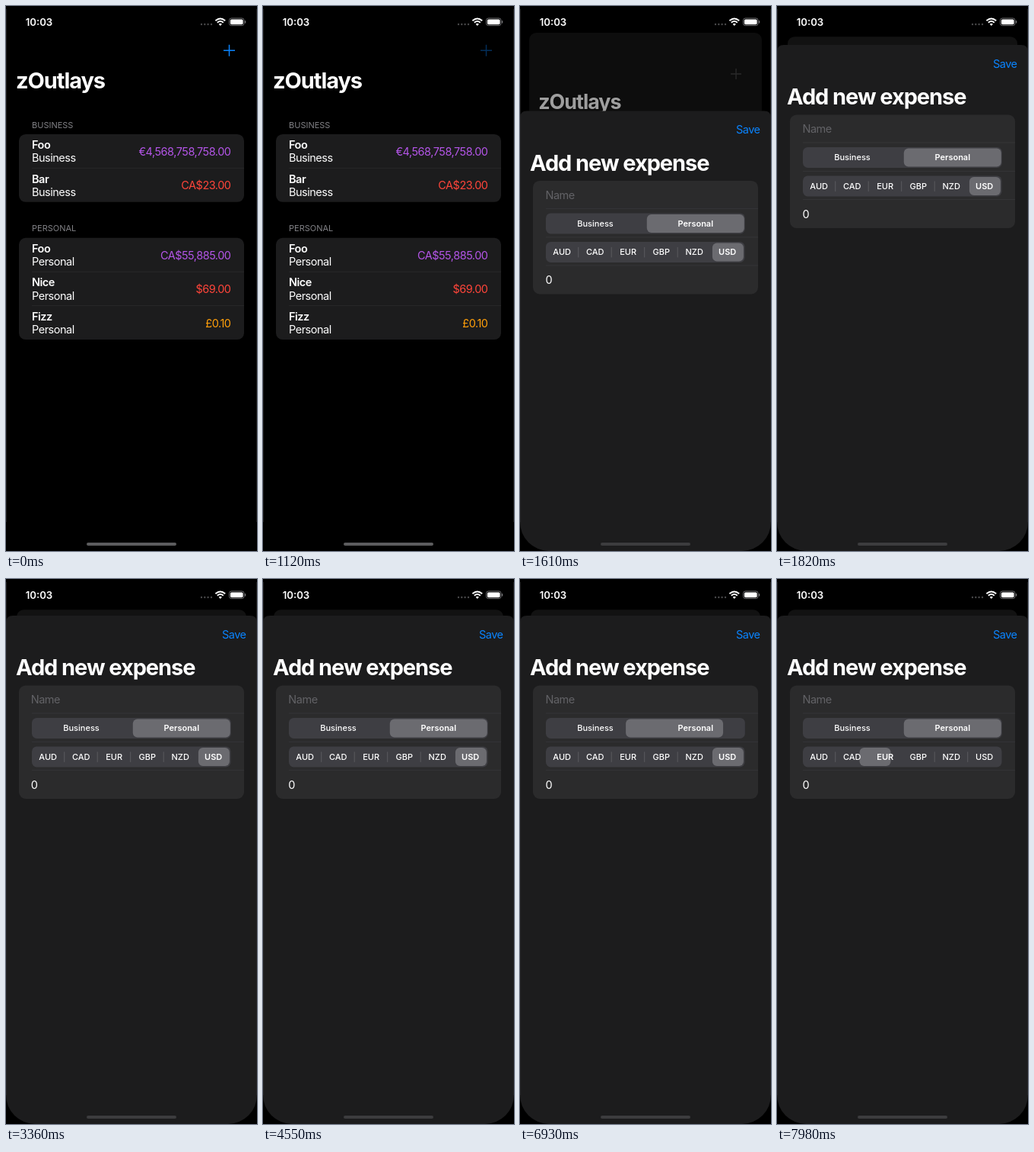
An HTML page for the animation above (8000 ms loop, 330 by 714 pixels).

```html
<!DOCTYPE html>
<html lang="en">
<head>
<meta charset="utf-8">
<title>Expense sheet</title>
<style>
  html, body { margin: 0; width: 100%; height: 100%; overflow: hidden; background: #000; }
  svg { display: block; width: 330px; height: 714px; }
  text { font: 400 14.5px Inter, sans-serif; letter-spacing: -.034em; fill: #fff; }
  .title { font-size: 29px; font-weight: 700; letter-spacing: -.037em; }
  .head { font-weight: 600; }
  .section { font-size: 11px; letter-spacing: 0; fill: #808085; }
  .segment { font-size: 11px; font-weight: 500; letter-spacing: 0; text-anchor: middle; }
  .segment.on { font-weight: 600; }
  .time { font-size: 13.2px; font-weight: 600; letter-spacing: 0; }
  .end { text-anchor: end; }
</style>
</head>
<body>
<svg id="stage" viewBox="0 0 330 714"></svg>
<script>
const LOOP = 8000;
const SEG = 43.5;
const BLUE = '#0a84ff', PURPLE = '#b455e8', RED = '#ff453a', ORANGE = '#ff9f0a';

const text = (x, y, s, cls = '', fill = '') =>
  `<text x="${x}" y="${y}" class="${cls}"${fill && ` style="fill:${fill}"`}>${s}</text>`;
const box = (x, y, w, h, r, fill, id = '') =>
  `<rect x="${x}" y="${y}" width="${w}" height="${h}" rx="${r}" fill="${fill}"${id && ` id="${id}"`}/>`;
const rule = (y, color) => `<path d="M34 ${y}H313" stroke="${color}" stroke-width=".8"/>`;

function section(top, name, rows) {
  const pitch = 44.4;
  return text(34, top - 8.5, name.toUpperCase(), 'section') +
    box(17, top, 296, pitch * rows.length, 8.8, '#1c1c1d') +
    rows.map(([item, amount, color], i) => {
      const y = top + i * pitch;
      return (i ? rule(y, '#2b2b2d') : '') +
        text(34, y + 19.2, item, 'head') + text(34, y + 36.3, name) +
        text(295.5, y + 28, amount, 'end', color);
    }).join('');
}

const currencies = ['AUD', 'CAD', 'EUR', 'GBP', 'NZD', 'USD'];
const separatorX = i => 33.2 + SEG * i;

const list = text(13, 107.5, 'zOutlays', 'title') +
  '<path id="plus" d="M286 58.3h15M293.5 50.8v15" stroke-width="1.5"/>' +
  section(168, 'Business', [['Foo', '€4,568,758,758.00', PURPLE], ['Bar', 'CA$23.00', RED]]) +
  section(303.8, 'Personal', [['Foo', 'CA$55,885.00', PURPLE], ['Nice', '$69.00', RED], ['Fizz', '£0.10', ORANGE]]);

const form = box(17, 92, 296, 148.5, 8.8, '#2b2b2c') +
  [128.5, 166, 203].map(y => rule(y, '#38383a')).join('') +
  `<g class="field">${text(33.5, 116, 'Name', '', '#626266')}</g>` +
  box(34, 134.5, 261.8, 27, 6.5, '#3e3e43') +
  box(0, 136, 128, 24, 6, '#6b6b70', 'kindThumb') +
  text(99, 152, 'Business', 'segment kind') + text(230.8, 152, 'Personal', 'segment kind') +
  box(34, 172, 261.5, 27, 6.5, '#3e3e43') +
  [1, 2, 3, 4, 5].map(i =>
    `<path class="separator" d="M${separatorX(i)} 179v13.5" stroke="#5a5a5f"/>`).join('') +
  box(0, 173.5, 41, 24, 6, '#6b6b70', 'moneyThumb') +
  currencies.map((c, i) => text(55.2 + SEG * i, 189.5, c, 'segment money')).join('') +
  `<g class="field">${text(33.5, 227.5, '0')}</g>`;

const sheet = '<path d="M0 800V9Q0 0 9 0H321Q330 0 330 9V800Z" fill="#1c1c1d"/>' +
  text(315.5, 29.5, 'Save', 'end', BLUE) +
  text(13, 78.3, 'Add new expense', 'title') +
  `<g transform="translate(0 -.6)">${form}</g>`;

const statusBar = text(25.7, 25.5, '10:03', 'time') +
  [257, 261.3, 265.6, 270].map(x => `<circle cx="${x}" cy="24" r="1.2" fill="#48484a"/>`).join('') +
  `<g fill="none" stroke="#fff" stroke-width="1.9">
    <path d="M275.4 19.2Q281.8 13.6 288.2 19.2M277.8 21.8Q281.8 18.3 285.8 21.8"/>
    <path d="M281.8 26l-2.1-2.3q2.1-1.7 4.2 0z" fill="#fff" stroke="none"/>
    <rect x="293.5" y="16" width="19.5" height="9.6" rx="2.8" stroke="#77777a" stroke-width=".9"/>
    <path d="M314.6 19.2v3.2" stroke="#77777a" stroke-width="1.2"/>
  </g>` + box(294.9, 17.4, 16.7, 6.8, 1.6, '#fff');

const stage = document.getElementById('stage');
stage.innerHTML = `
  <clipPath id="screen"><path d="M0 0H330V676A38 38 0 0 1 292 714H38A38 38 0 0 1 0 676Z"/></clipPath>
  <g clip-path="url(#screen)">
    <g id="back">${box(0, 0, 330, 714, 10, '#000', 'backdrop')}<g id="list">${list}</g></g>
    <g id="sheet">${sheet}</g>
    ${statusBar}
    ${box(106, 703, 118, 4, 2, '#5c5c5e', 'home')}
  </g>
  <path d="M.4 4V676M329.6 4V676" stroke="#28282a" stroke-width=".8"/>`;

const $ = id => document.getElementById(id);
const all = cls => [...stage.getElementsByClassName(cls)];
const fields = all('field'), kinds = all('kind'), moneys = all('money'), separators = all('separator');
const clamp = v => Math.max(0, Math.min(1, v));

// Critically damped spring from 0 to 1; rate is per second.
function spring(t, start, rate) {
  const x = Math.max(0, t - start) / 1000 * rate;
  return 1 - (1 + x) * Math.exp(-x);
}

function shake(t, start) {
  const s = (t - start) / 1000;
  return s < 0 || s > 1 ? 0 : -17 * Math.exp(-4 * s) * Math.sin(2 * Math.PI * s / .28);
}

// Taps as [time, chosen segment].
const kindTaps = [[4795, 0], [5495, 1], [6265, 0], [6745, 1]];
const moneyTaps = [[7455, 2], [7907, 1]];

const thumbPosition = (initial, taps, t) =>
  taps.reduce((pos, [start, to]) => pos + (to - pos) * spring(t, start, 15.7), initial);

const markNearest = (labels, pos) =>
  labels.forEach((label, i) => label.classList.toggle('on', i === Math.round(pos)));

function draw(t) {
  const p = spring(t, 1427, 19.1);
  $('back').setAttribute('transform',
    `translate(165 ${357 + 10 * p}) scale(${1 - .085 * p}) translate(-165 -357)`);
  const grey = 18 * p * p;
  $('backdrop').setAttribute('fill', `rgb(${grey},${grey},${grey})`);
  $('list').setAttribute('opacity', 1 - .4 * clamp(p * 3.3));
  $('plus').setAttribute('stroke', t < 1400 ? BLUE : '#3c3c3e');
  $('plus').setAttribute('opacity', t >= 1120 && t < 1400 ? .35 : 1);
  $('sheet').setAttribute('transform', `translate(0 ${714 - 666 * p})`);
  $('home').setAttribute('fill', p > .1 ? '#3c3c3e' : '#5c5c5e');

  const dx = shake(t, 2780) + shake(t, 3700);
  fields.forEach(f => f.setAttribute('transform', `translate(${dx} 0)`));

  const kind = thumbPosition(1, kindTaps, t), money = thumbPosition(5, moneyTaps, t);
  $('kindThumb').setAttribute('x', 35.6 + 131.2 * kind);
  markNearest(kinds, kind);
  const left = 35.4 + SEG * money;
  $('moneyThumb').setAttribute('x', left);
  markNearest(moneys, money);
  separators.forEach((line, i) => {
    const distance = Math.abs(separatorX(i + 1) - left - 20.5);
    line.setAttribute('opacity', clamp((distance - 36) / 14));
  });
}

function tick() {
  draw(performance.now() % LOOP);
  requestAnimationFrame(tick);
}
tick();
</script>
</body>
</html>
```
